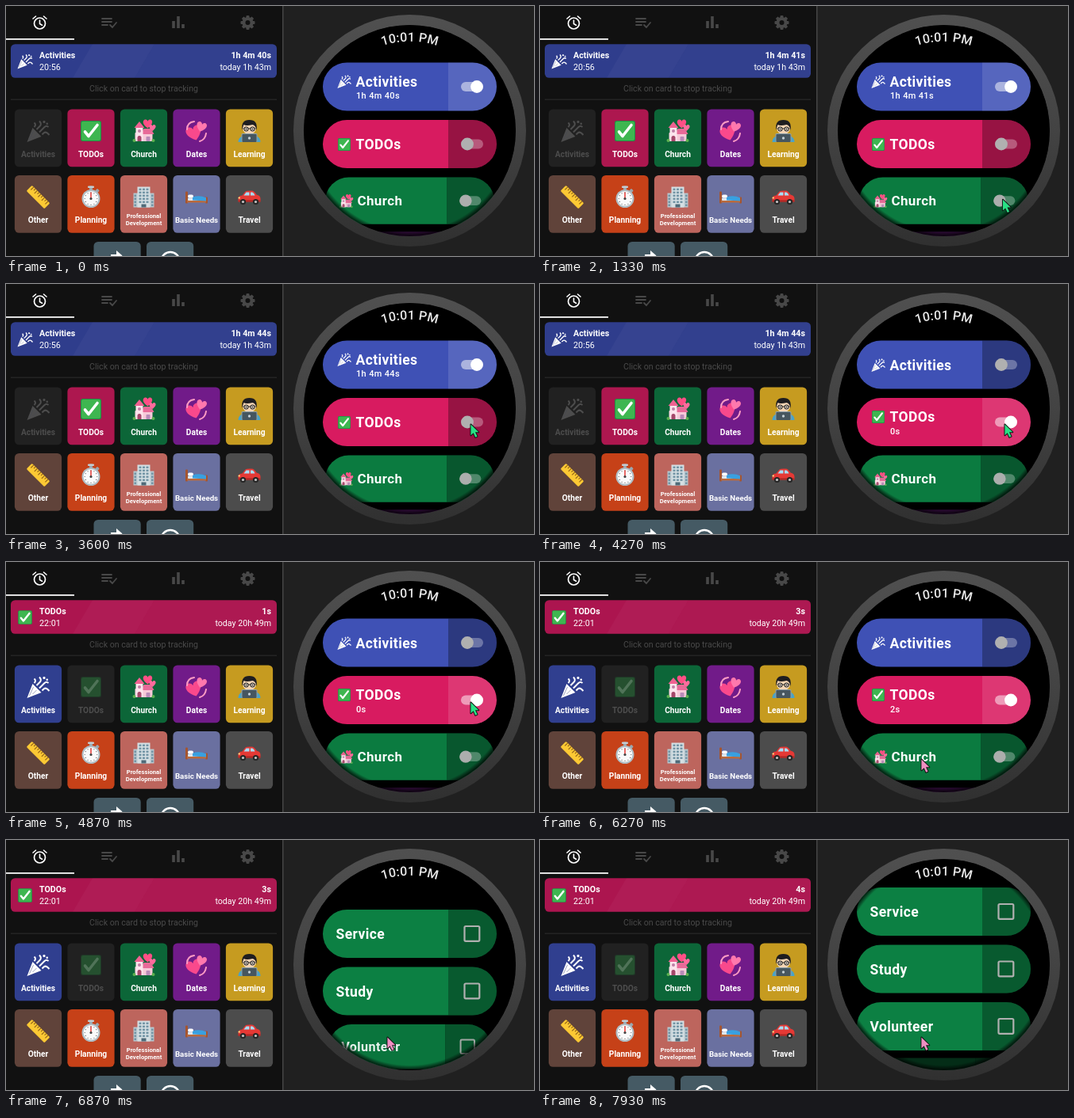
These frames come from a looping animation (665 px wide and 316 px high, 8000 ms). An HTML page with a canvas:

```html
<!DOCTYPE html>
<html lang="en">
<head>
<meta charset="utf-8">
<title>Time tracker on phone and watch</title>
<style>
html, body { margin: 0; width: 100%; height: 100%; overflow: hidden; background: #111; }
canvas { display: block; }
</style>
</head>
<body>
<canvas id="stage" width="665" height="316"></canvas>
<script>
const ctx = document.getElementById('stage').getContext('2d');
const LOOP = 8000, TAU = Math.PI * 2;
const WATCH = { x: 508.5, y: 157.5, r: 133.5 };

const clamp = v => Math.max(0, Math.min(1, v));
const ease = v => v * v * (3 - 2 * v);
const span = (t, from, to) => ease(clamp((t - from) / (to - from)));
const mix = (a, b, k) => a + (b - a) * k;

function box(x, y, w, h, r, fill) {
  ctx.beginPath();
  ctx.roundRect(x, y, w, h, r);
  ctx.fillStyle = fill;
  ctx.fill();
}
function disc(x, y, r, fill) {
  ctx.beginPath();
  ctx.arc(x, y, r, 0, TAU);
  ctx.fillStyle = fill;
  ctx.fill();
}
function shape(d, fill) {
  ctx.fillStyle = fill;
  ctx.fill(new Path2D(d));
}
function line(d, stroke, width) {
  ctx.strokeStyle = stroke;
  ctx.lineWidth = width;
  ctx.stroke(new Path2D(d));
}
function text(str, x, y, size, weight, fill, align = 'left', spacing = 0) {
  ctx.font = `${weight} ${size}px Roboto, sans-serif`;
  ctx.letterSpacing = spacing + 'px';
  ctx.textAlign = align;
  ctx.fillStyle = fill;
  ctx.fillText(str, x, y);
}
function at(x, y, scale, draw, angle = 0) {
  ctx.save();
  ctx.translate(x, y);
  ctx.rotate(angle);
  ctx.scale(scale, scale);
  draw();
  ctx.restore();
}
const HEART = 'M0 6C-10-1-6-7-2.5-6Q-.5-5.5 0-3.5Q.5-5.5 2.5-6C6-7 10-1 0 6Z';
const heart = (x, y, s, fill, angle = 0) => at(x, y, s, () => shape(HEART, fill), angle);

// Each icon fills a box of about 28 units around the origin.
const icons = {
  popper() {
    ctx.lineJoin = 'round';
    shape('M-14 14L-7-4L4 7Z', '#fff');
    line('M-11 11L-6 0M-7 9L-2 4', 'rgba(40,50,110,.45)', 1);
    line('M1.5 1.5L8-5Q10.5-7.5 13-5', '#fff', 2);
    line('M-2-2L2-6Q5-9 1.5-12.5', '#fff', 2);
    line('M5 4.5L7 2.5Q9.5 .5 12 3L14 5', '#fff', 2);
    line('M-5-5Q-2-8-5-10.5', '#fff', 2);
    box(6, -13, 3, 3, 1, '#fff');
    box(10, -10.5, 2.5, 2.5, 1, '#fff');
  },
  check() {
    box(-13, -13, 26, 26, 2.5, '#1f8f43');
    box(-12, -12, 24, 24, 2, '#3eb650');
    ctx.lineJoin = ctx.lineCap = 'round';
    line('M-7.5 1L-3 6.5L8-7.5', '#fff', 3.6);
  },
  church() {
    box(-11, 2, 22, 11, 1, '#f6c9d8');
    shape('M-4 4L0-3H9L13 4Z', '#e86a98');
    box(-10, -5, 9, 18, 0, '#fce4ec');
    shape('M-12-4L-5.5-12L1-4Z', '#f06292');
    box(-8, 6, 5, 7, [2.5, 2.5, 0, 0], '#a5476a');
    disc(-5.5, 0, 2, '#c07fa6');
    box(3, 7, 5, 6, 1, '#b98bb8');
    heart(5, -9, .9, '#ff4f86');
    heart(11, -4, .65, '#ff6b9d');
    box(-14, 10, 4, 4, 2, '#5bb04f');
    box(10, 10, 4, 4, 2, '#5bb04f');
  },
  hearts() {
    heart(-3, 3, 1.5, '#f9498c', -.3);
    heart(6, -5, 1, '#ff78ad', .3);
    ctx.lineCap = 'round';
    line('M-12-2Q-12-11-3-12M12 3Q11 11 4 13', '#ff9cc4', 2);
  },
  coder() {
    shape('M-14 14Q-14 5 0 5Q14 5 14 14Z', '#4aa3c7');
    disc(0, -4, 8.5, '#f5d5b5');
    shape('M-9-1Q-11-14 0-14Q11-14 9-1Q8-7 4-8Q-4-6-7-8Q-8-6-9-1Z', '#1e1d20');
    line('M-8-3H8', '#222', 1);
    for (const x of [-4, 4]) {
      disc(x, -2.5, 3, '#222');
      disc(x, -2.5, 2, '#f8eadd');
      disc(x, -2.5, 1, '#222');
    }
    box(-10, 3, 20, 11, 1.5, '#8fa1aa');
    box(-9, 4, 18, 10, 1, '#46565f');
    disc(0, 9, 1.7, '#c3ced4');
  },
  ruler() {
    ctx.rotate(Math.PI / 4);
    box(-16, -5, 32, 10, 1.5, '#fcc934');
    for (let i = 0; i < 9; i++) box(-13.5 + i * 3.2, -5, 1, i % 2 ? 3 : 5, 0, '#8a5a16');
  },
  stopwatch() {
    box(-2, -14, 4, 5, 1, '#9aa7ae');
    box(-4, -14, 8, 2.5, 1, '#c3ccd1');
    at(8, -8, 1, () => box(-2, -2, 4, 4, 1, '#9aa7ae'), .75);
    disc(0, 2, 11.5, '#b0bec5');
    disc(0, 2, 9.5, '#fafafa');
    for (let i = 0; i < 12; i++) {
      const a = i * TAU / 12;
      disc(Math.cos(a) * 7.8, 2 + Math.sin(a) * 7.8, .6, '#555');
    }
    line('M0 3V-6', '#e53935', 1.5);
    disc(0, 2, 1.6, '#444');
  },
  office() {
    box(-13, -5, 26, 18, 0, '#b8c7ce');
    box(-8, -13, 16, 26, 0, '#d5dfe3');
    for (let row = 0; row < 5; row++)
      for (let col = 0; col < 3; col++) box(-6 + col * 4.5, -11 + row * 4, 3, 2.5, 0, '#7395a5');
    for (const x of [-12, 9.5]) for (let y = -3; y < 10; y += 4) box(x, y, 2.5, 2.5, 0, '#7395a5');
    box(-3, 9, 6, 4, 0, '#4f6a78');
  },
  bed() {
    box(-14, -7, 3, 15, 1, '#a5552f');
    box(11, 0, 3, 8, 1, '#a5552f');
    box(-12, 4, 24, 3, 0, '#bb6a3c');
    box(-11, 1, 23, 3.5, 1, '#dfe8ee');
    shape('M-5 4V0Q4-3 12 1V5Z', '#39a0e0');
    box(-11, -3, 7, 4, 2, '#fff');
  },
  car() {
    shape('M-14 6V1Q-13-2-9-2L-5-7Q-4-8 0-8H3Q6-8 9-3Q14-2 14 2V6Z', '#e53935');
    shape('M-7-2L-4-6H0V-2ZM1.5-2V-6H4Q6-5 7-2Z', '#a8dcf5');
    box(-14, 4, 28, 2, 1, '#ab2623');
    for (const x of [-8, 8]) {
      disc(x, 6, 3.6, '#252525');
      disc(x, 6, 1.6, '#c6c6c6');
    }
    box(-14, 0, 2.5, 2, 1, '#ffe082');
  }
};

const tiles = [
  ['Activities', 'popper', '#303f8f'], ['TODOs', 'check', '#ad174f'],
  ['Church', 'church', '#0c6638'], ['Dates', 'hearts', '#711b89'],
  ['Learning', 'coder', '#c69b20'], ['Other', 'ruler', '#60433a'],
  ['Planning', 'stopwatch', '#c64118'], ['Professional Development', 'office', '#bd655d'],
  ['Basic Needs', 'bed', '#6a70a0'], ['Travel', 'car', '#4c4c4c']
];

function drawTabs() {
  ctx.lineCap = ctx.lineJoin = 'round';
  at(42.5, 21, 1, () => {
    ctx.beginPath();
    ctx.arc(0, 1, 7, 0, TAU);
    ctx.strokeStyle = '#fff';
    ctx.lineWidth = 1.7;
    ctx.stroke();
    line('M0-3V1.5L3 3.3M-8.5-5L-5-8M8.5-5L5-8', '#fff', 1.6);
  });
  const grey = '#484848';
  at(130, 21, 1, () => line('M-9-5H3M-9-1H3M-9 3H-2M1 3L4 6L9 0', grey, 1.8));
  ctx.lineCap = 'butt';
  at(217, 21, 1, () => line('M-6-2V7M0-8V7M6 2V7', grey, 3.6));
  at(304.5, 21, 1, () => {
    for (let i = 0; i < 4; i++) {
      ctx.rotate(Math.PI / 4);
      box(-2, -9, 4, 18, 1, grey);
    }
    disc(0, 0, 7, grey);
    disc(0, 0, 3, '#111');
  });
  box(0, 41, 86, 1.7, 0, '#fff');
}

function drawCurrent(t, todo, seconds) {
  ctx.save();
  box(6, 48.2, 335, 42.6, 5.5, todo ? '#ac154f' : '#2f3d8c');
  ctx.clip();
  shape('M109 48H187L162 91H84Z', 'rgba(255,255,255,.03)');
  shape('M187 48H341V91H162Z', 'rgba(255,255,255,.015)');
  ctx.restore();
  at(24, 70, .68, icons[todo ? 'check' : 'popper']);
  text(todo ? 'TODOs' : 'Activities', 42, 66, 10.7, 700, '#fff');
  text(todo ? '22:01' : '20:56', 42, 81, 10.8, 400, '#fff');
  const elapsed = todo ? (t < 5100 ? 1 : Math.min(4, 2 + Math.floor((t - 5100) / 1000))) + 's' : `1h 4m ${seconds}s`;
  text(elapsed, 334, 66, 10.7, 700, '#fff', 'right');
  text(todo ? 'today 20h 49m' : 'today 1h 43m', 334, 81, 10.65, 400, '#fff', 'right');
}

function drawTile([name, icon, color], i, active) {
  const x = 10.9 + (i % 5) * 66.5, y = 130.5 + Math.floor(i / 5) * 83.5, mid = x + 29.6;
  box(x, y, 59.2, 72.8, 5.5, active ? '#212121' : color);
  ctx.globalAlpha = active ? .2 : 1;
  at(mid, y + 27.5, 1, icons[icon]);
  if (name.length > 12) {
    name.split(' ').forEach((word, n) => text(word, mid, y + 54.3 + n * 9, 7.7, 700, '#fff', 'center'));
  } else {
    text(name, mid, y + 60, name.length > 10 ? 9.7 : 10.2, 700, '#fff', 'center');
  }
  ctx.globalAlpha = 1;
}

function drawPhone(t, seconds) {
  const todo = t >= 4600;
  box(0, 0, 349, 316, 0, '#111');
  drawTabs();
  drawCurrent(t, todo, seconds);
  text('Click on card to stop tracking', 173.5, 108, 10.6, 400, '#4a4a4a', 'center');
  box(6, 117.5, 335, 1.5, 0, '#242424');
  tiles.forEach((tile, i) => drawTile(tile, i, i === (todo ? 1 : 0)));
  for (const x of [110.5, 177]) box(x, 298, 59.2, 30, 5.5, '#455a64');
  shape('M139 309L146.5 315.5L139 322Z', '#fff');
  box(132, 314, 8, 3, 0, '#fff');
  ctx.beginPath();
  ctx.arc(207, 322.5, 11.5, 0, TAU);
  ctx.strokeStyle = '#fff';
  ctx.lineWidth = 2.5;
  ctx.stroke();
}

function drawToggle(x, y, on) {
  const base = ctx.globalAlpha;
  ctx.globalAlpha = base * mix(.3, .5, on);
  box(x - 14, y - 6, 28, 12, 6, '#fff');
  ctx.globalAlpha = base;
  const v = Math.round(mix(176, 255, on));
  disc(x + mix(-6, 6, on), y, 7.9, `rgb(${v},${v},${v})`);
}

// Draws a chip that shrinks and dims towards the bottom edge; returns the next chip's top.
function drawChip(top, chip) {
  const s = Math.max(.75, 1 - Math.max(0, top - 205.5) * .0026);
  const fade = ctx.globalAlpha;
  ctx.save();
  ctx.translate(WATCH.x, top);
  ctx.scale(s, s);
  ctx.globalAlpha = fade * Math.max(.3, s < .85 ? .35 : 1 - (1 - s) * 1.2);
  box(-109.5, 0, 158, 61, [30.5, 0, 0, 30.5], chip.color);
  box(48.5, 0, 61, 61, [0, 30.5, 30.5, 0], chip.color);
  const on = chip.on || 0;
  box(48.5, 0, 61, 61, [0, 30.5, 30.5, 0], `rgba(0,0,0,${.3 * (1 - on)})`);
  box(48.5, 0, 61, 61, [0, 30.5, 30.5, 0], `rgba(255,255,255,${.12 * on})`);
  if (chip.icon) {
    const lift = chip.sub ? 7 : 0;
    at(-82.5, 31 - lift, .61, icons[chip.icon]);
    text(chip.name, -68, 37 - lift, 17.5, 700, '#fff', 'left', .4);
    if (chip.sub) text(chip.sub, -67.5, 45.5, 11, 500, '#fff', 'left', .35);
    drawToggle(78.5, 30.5, on);
  } else {
    text(chip.name, -93, 37, 17.5, 700, '#fff', 'left', .4);
    ctx.beginPath();
    ctx.roundRect(69, 21, 18.8, 18.8, 1.5);
    ctx.strokeStyle = '#b0b0b0';
    ctx.lineWidth = 2.2;
    ctx.stroke();
  }
  ctx.restore();
  return top + 61 * s + (top > 200 ? 9.5 : 11.5);
}

function drawClock() {
  const label = '10:01 PM', radius = 112.8, size = 16;
  ctx.font = `500 ${size}px Roboto, sans-serif`;
  ctx.letterSpacing = '0px';
  const halves = [...label].map(c => (ctx.measureText(c).width + .2) / radius / 2);
  let angle = -halves.reduce((a, b) => a + b);
  [...label].forEach((c, i) => {
    angle += halves[i];
    at(WATCH.x, WATCH.y, 1, () => text(c, 0, -radius, size, 500, '#e8e8e8', 'center'), angle);
    angle += halves[i];
  });
}

function drawWatch(t, seconds) {
  box(349, 0, 316, 316, 0, '#202020');
  box(348, 0, 1.5, 316, 0, '#454545');
  const rim = ctx.createLinearGradient(0, 11, 0, 304);
  rim.addColorStop(0, '#505050');
  rim.addColorStop(.5, '#434343');
  rim.addColorStop(1, '#303030');
  disc(WATCH.x, WATCH.y, 146.5, rim);
  disc(WATCH.x, WATCH.y, WATCH.r, '#000');

  ctx.save();
  ctx.clip();
  const on = span(t, 3950, 4170), picked = t >= 4020, page = t >= 6740;
  const green = '#0c8043';
  let chips, top;
  if (page) {
    chips = ['Service', 'Study', 'Volunteer', ''].map(name => ({ name, color: green }));
    top = mix(88, 60, span(t, 6880, 7110));
    ctx.globalAlpha = clamp((t - 6720) / 100);
  } else {
    const ran = t < 5000 ? 0 : t < 6000 ? 1 : 2;
    chips = [
      { name: 'Activities', icon: 'popper', color: '#3f51b5', on: 1 - on, sub: picked ? '' : `1h 4m ${seconds}s` },
      { name: 'TODOs', icon: 'check', color: '#d81b60', on, sub: picked ? ran + 's' : '' },
      { name: 'Church', icon: 'church', color: green },
      { name: 'Dates', icon: 'hearts', color: '#8e24aa' }
    ];
    top = 71.5;
  }
  for (const chip of chips) top = drawChip(top, chip);
  ctx.globalAlpha = 1;
  const shade = ctx.createRadialGradient(WATCH.x, WATCH.y, 127, WATCH.x, WATCH.y, WATCH.r);
  shade.addColorStop(0, 'rgba(0,0,0,0)');
  shade.addColorStop(1, 'rgba(0,0,0,.8)');
  disc(WATCH.x, WATCH.y, WATCH.r, shade);
  drawClock();
  ctx.restore();
}

const moves = [
  [850, 1800, 504, 177],
  [2620, 3130, 585, 177],
  [5550, 6170, 480, 249]
];

function drawCursor(t) {
  if (t < 850) return;
  let x = 664, y = 314;
  for (const [from, to, toX, toY] of moves) {
    const k = span(t, from, to);
    x = mix(x, toX, k);
    y = mix(y, toY, k);
  }
  const pink = span(t, 5550, 6170);
  at(x, y, .86, () => {
    const arrow = 'M.5.5V16.5L4.3 13L7.2 19.5L10 18.3L7 12H12Z';
    ctx.lineJoin = 'round';
    line(arrow, '#111', 2.2);
    shape(arrow, `hsl(${mix(150, 328, pink)},75%,${mix(52, 75, pink)}%)`);
  });
}

function frame(now) {
  const t = now % LOOP;
  const seconds = Math.min(44, 40 + Math.floor((t + 600) / 1000));
  drawPhone(t, seconds);
  drawWatch(t, seconds);
  drawCursor(t);
  requestAnimationFrame(frame);
}
requestAnimationFrame(frame);
</script>
</body>
</html>
```
